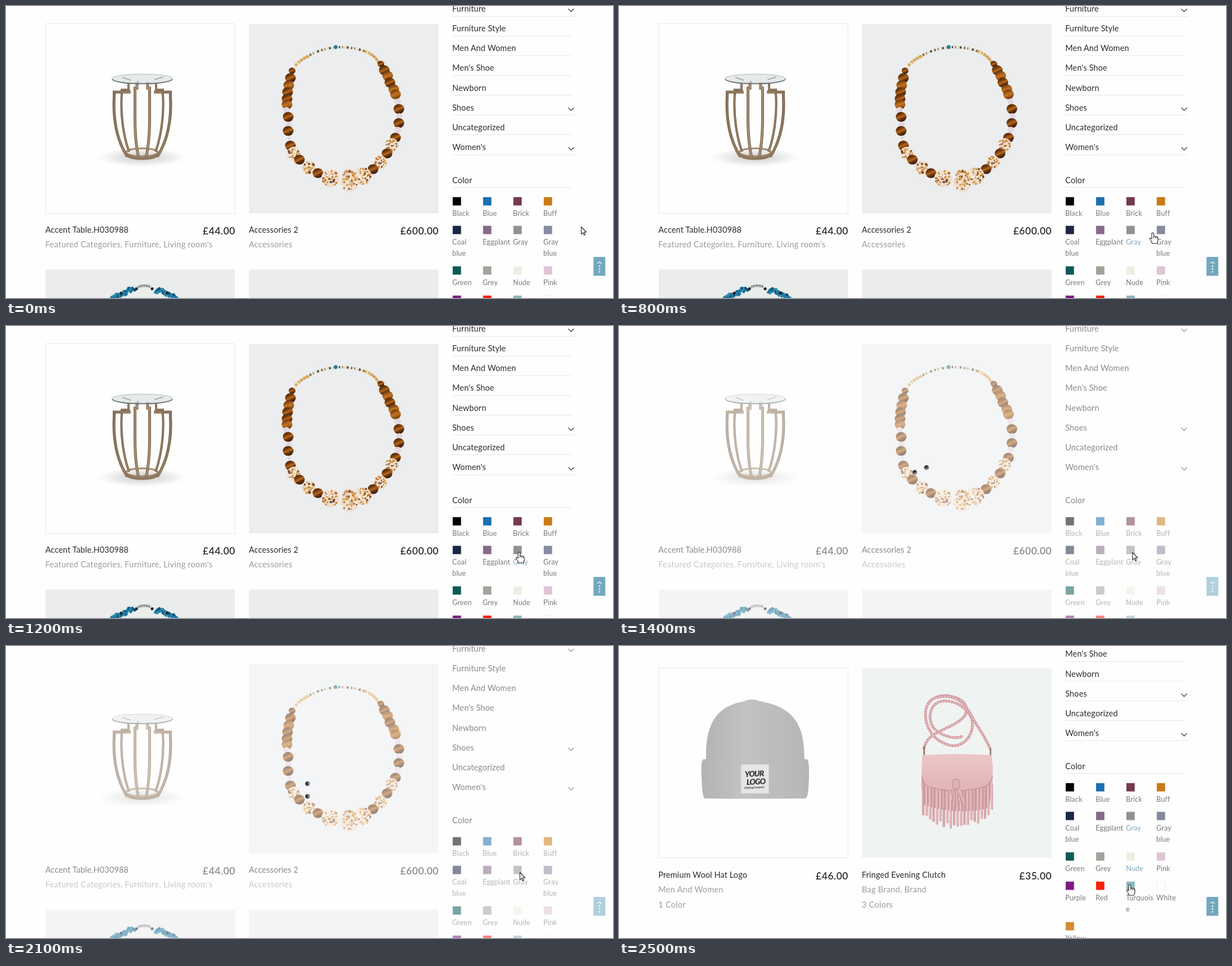
An HTML page for the animation above (2.6 s loop, 1080 by 519 pixels).

```html
<!DOCTYPE html>
<html lang="en">
<head>
<meta charset="utf-8">
<title>Shop colour filter</title>
<style>
  html, body { margin: 0; width: 100%; height: 100%; overflow: hidden; background: #fefefe; }
  svg { display: block; width: 100%; height: 100%; }
  text { font: 14.5px Lato, "Open Sans", sans-serif; fill: #2c2c2c; letter-spacing: .12px; }
  .price { font-size: 17.5px; font-weight: 600; letter-spacing: .5px; text-anchor: end; }
  .meta { fill: #9c9c9c; letter-spacing: .3px; }
  .label { font-size: 12.6px; fill: #7a7a7a; letter-spacing: .17px; }
  .label.on { fill: #80a9bb; }
  .rule { stroke: #e6e7ea; fill: none; }
  .loading .rule { opacity: 0; }
  .patch { font-weight: 900; font-style: italic; fill: #3a3a3a; letter-spacing: -.9px; }
  .patch.small { font-weight: 700; letter-spacing: -.2px; }
</style>
</head>
<body>
<svg id="stage" viewBox="0 0 1080 519" preserveAspectRatio="xMinYMin meet">
  <defs>
    <linearGradient id="wood" gradientTransform="rotate(65 .5 .5)">
      <stop offset="0" stop-color="#4d2509"/><stop offset=".3" stop-color="#7d420f"/>
      <stop offset=".5" stop-color="#b8691e"/><stop offset=".68" stop-color="#6b350d"/>
      <stop offset="1" stop-color="#35190a"/>
    </linearGradient>
    <linearGradient id="amber" gradientTransform="rotate(70 .5 .5)">
      <stop offset="0" stop-color="#6b350c"/><stop offset=".5" stop-color="#c47522"/><stop offset="1" stop-color="#6e380e"/>
    </linearGradient>
    <linearGradient id="metal" gradientUnits="userSpaceOnUse" x1="190" y1="0" x2="296" y2="0">
      <stop offset="0" stop-color="#8a7359"/><stop offset=".4" stop-color="#a58c70"/><stop offset="1" stop-color="#846d53"/>
    </linearGradient>
    <linearGradient id="wool">
      <stop offset="0" stop-color="#b5b6b7"/><stop offset=".4" stop-color="#c6c7c8"/><stop offset="1" stop-color="#b8b9ba"/>
    </linearGradient>
    <linearGradient id="leather" x2="0" y2="1">
      <stop offset="0" stop-color="#ecc6c8"/><stop offset="1" stop-color="#e2b3b7"/>
    </linearGradient>
    <linearGradient id="ball" x2="0" y2="1">
      <stop offset=".2" stop-color="#202326"/><stop offset="1" stop-color="#a4a8aa"/>
    </linearGradient>
    <radialGradient id="shade">
      <stop offset="0" stop-color="#8c8a88" stop-opacity=".5"/><stop offset="1" stop-color="#aaa" stop-opacity="0"/>
    </radialGradient>
    <pattern id="knit" width="3" height="5" patternUnits="userSpaceOnUse">
      <path d="M.8 0V3M2.3 2V5" stroke="#8d8f91" stroke-width=".7" opacity=".3"/>
    </pattern>
  </defs>
</svg>
<script>
const LOOP = 2600, STEP = 100;
const stage = document.getElementById('stage');

function add(parent, tag, attrs = {}, content = '') {
  const node = document.createElementNS('http://www.w3.org/2000/svg', tag);
  for (const key in attrs) node.setAttribute(key, attrs[key]);
  node.textContent = content;
  parent.append(node);
  return node;
}
const group = (parent, attrs) => add(parent, 'g', attrs);
const text = (parent, x, y, str, cls = '') => add(parent, 'text', { x, y, class: cls }, str);
const circle = (parent, cx, cy, r, fill) => add(parent, 'circle', { cx, cy, r, fill });
const rect = (parent, x, y, width, height, attrs) => add(parent, 'rect', { x, y, width, height, ...attrs });
const line = (parent, d, stroke, width, more) =>
  add(parent, 'path', { d, stroke, 'stroke-width': width, fill: 'none', ...more });
const shape = (parent, d, fill, more) => add(parent, 'path', { d, fill, ...more });

let seed = 7;
const random = () => (seed = seed * 16807 % 2147483647) / 2147483647;
const spread = n => (random() * 2 - 1) * n;

function card(parent, x, y, fill) {
  rect(parent, x + .5, y + .5, 337, 337, fill ? { fill } : { class: 'rule' });
}
function caption(parent, x, y, title, price, ...meta) {
  text(parent, x, y, title);
  text(parent, x + 338, y + 3, price, 'price');
  meta.forEach((str, i) => text(parent, x, y + 26 + 27 * i, str, 'meta'));
}

function drawTable(g) {
  add(g, 'ellipse', { cx: 242, cy: 269, rx: 80, ry: 17, fill: 'url(#shade)' });
  add(g, 'ellipse', { cx: 242, cy: 260, rx: 28, ry: 7, fill: 'none', stroke: '#a48c6e', 'stroke-width': 3 });
  for (const transform of ['', 'translate(485 0) scale(-1 1)']) {
    const half = group(g, { transform });
    const leg = (d, width) => {
      line(half, d, '#66523d', width);
      line(half, d, 'url(#metal)', width - 1.4);
    };
    leg('M218 138V149H206V156C203 195 210 235 219 259', 4);
    leg('M222 153H192.5V160C190 205 198 240 216 268', 5);
    leg('M233 135V146H229.5V190C229 225 231 248 236 270', 5);
  }
  line(g, 'M213 262C216 274 268 274 272 262', '#8d765a', 5);
  add(g, 'ellipse', { cx: 242.5, cy: 129, rx: 54, ry: 8, fill: '#dde3e3', 'fill-opacity': .7, stroke: '#aeb9b8' });
  line(g, 'M189 130C194 141 291 141 296 130', '#596764', 1.6);
  line(g, 'M207 127L222 132M234 133L236 136M264 131L280 126', '#a39d90', 1.5);
}

function speckled(g, x, y, r) {
  circle(g, x, y, r, '#efdccb');
  for (let i = 0; i < r * 3.2; i++) {
    const a = random() * 6.283, d = Math.sqrt(random()) * (r - 1.5);
    const fill = ['#c4812f', '#d79a4d', '#fff5ec', '#6d4030', '#c9893e'][i % 5];
    circle(g, x + d * Math.cos(a), y + d * Math.sin(a), .8 + random() * 1.4, fill);
  }
}

// Bead strings: x, y, kind (w wood, a amber, k knot, p pink, t tiny, s small speckled, b big speckled)
const LEFT = '509,115,k 506,128,w 503,141,a 501,153,w 500,165,w 500,175,a 499,185,p 503,211,p 502,197,w 502,222,w ' +
  '504,235,t 506,248,w 512,262,s 522,273,w 539,287,s 555,297,w 577,306,b';
const RIGHT = '667,103,k 673,114,w 679,124,a 683,136,w 690,148,a 693,157,a 697,170,p 699,183,w 700,196,p 699,208,w ' +
  '697,220,p 693,234,w 686,247,s 678,262,w 666,278,s 653,290,w 634,302,b 610,301,s 611,314,b';
const RADIUS = { k: 6, w: 9.5, a: 9.5, p: 5.5, t: 3, s: 12, b: 16 };

function drawBeads(g) {
  for (const d of ['M541 87Q562 76 583 74', 'M592 73Q618 73 637 80']) {
    line(g, d, '#e7dfcc', 5);
    line(g, d, '#45423c', 4, { 'stroke-dasharray': '2 4 1 7 3 5' });
  }
  line(g, 'M515 106Q525 94 541 88M637 80Q657 87 664 102', '#d3a04f', 5, { 'stroke-dasharray': '5 1' });
  line(g, 'M513 109L523 98M641 82L649 85', '#efe0bd', 4, { 'stroke-dasharray': '4 3' });
  circle(g, 586.5, 73, 3.4, '#237d91');
  for (const bead of (LEFT + ' ' + RIGHT).split(' ')) {
    const [x, y, kind] = bead.split(',');
    const r = RADIUS[kind];
    if ('sb'.includes(kind)) speckled(g, +x, +y, r);
    else if ('pt'.includes(kind)) circle(g, x, y, r, '#e5d5df');
    else add(g, 'ellipse', { cx: x, cy: y, rx: r, ry: r * .92, fill: `url(#${kind === 'a' ? 'amber' : 'wood'})` });
  }
}

function drawBlueBeads(g) {
  for (let i = 0; i < 46; i++) {
    const k = i / 45, x = k < .5 ? 189 + k * 78 : 266 + (k - .5) * 78;
    const y = 502 + Math.abs(x - 246) ** 2 / 190 + spread(3);
    rect(g, x - 2, y - 4, 4, 9, {
      fill: ['#176f9b', '#2a8bb4', '#0f5278', '#328fa9'][i % 4], transform: `rotate(${spread(50)} ${x} ${y})`
    });
  }
  for (const x of [205, 232, 260, 287]) circle(g, x, 501.5 + (x - 246) ** 2 / 190, 2.6, '#20232b');
  line(g, 'M234 500Q245 495 257 499', '#a6a9a9', 5, { 'stroke-dasharray': '4 1' });
  line(g, 'M236 499Q245 494 256 499', '#63686b', 1.2);
}

function drawHat(g) {
  const crown = 'M155 207C153 145 168 112 214 100Q222 99 229 96Q239 93 250 98C312 108 332 142 329.5 207Z';
  const cuff = 'M151 201Q243 211 334 201Q339 202 338 234Q337 270 332 271Q243 272 153 271Q148 270 147 234Q145 202 151 201Z';
  shape(g, crown, 'url(#wool)');
  shape(g, crown, 'url(#knit)');
  line(g, 'M155 203Q243 212 331 203', '#919394', 3, { opacity: .6 });
  shape(g, cuff, 'url(#wool)');
  shape(g, cuff, 'url(#knit)');
  rect(g, 217, 210.5, 49.5, 51.5, { fill: '#e5e6e7', stroke: '#d1d2d3' });
  const word = (x, y, size, str, cls) =>
    add(g, 'text', { x, y, class: cls, style: `font-size:${size}px`, transform: `rotate(-3 ${x} ${y})` }, str);
  word(224, 233, 14, 'YOUR', 'patch');
  word(227, 247, 14, 'LOGO', 'patch');
  word(223, 254, 5, 'Clothing Company', 'patch small');
}

function drawBag(g) {
  const strap = d => {
    line(g, d, '#c48c92', 4.6);
    line(g, d, '#e9bcc0', 3.4, { 'stroke-dasharray': '3.6 1.4' });
  };
  strap('M542 184C546 165 556 158 578 148C605 136 622 125 618 109C612 90 580 83 560 93C540 105 542 135 556 155C566 170 590 181 604 176C622 170 632 150 628 131');
  strap('M628 131C622 112 600 96 575 98C552 102 548 130 560 146C573 160 598 167 612 160');
  strap('M563 92C590 84 612 95 624 118C634 140 652 160 661 184');
  line(g, 'M543 178V196M661 182V198', '#8d7466', 2.6);

  shape(g, 'M540 195H663L664 250L658 288Q600 302 541 282L538 248Z', '#cf9fa4');
  for (let i = 0; i < 21; i++) {
    const x = 541 + i * 6.1, end = 320 - (x - 597) ** 2 / 185 + spread(6);
    line(g, `M${x} 236V${end}`, i % 3 ? '#e6bbbf' : '#dba9ae', 4);
    line(g, `M${x + 1.8} 246V${end}`, '#b98489', .8);
  }
  shape(g, 'M541 194Q602 190 662 194C667 214 667 236 655 248Q603 267 548 249C535 237 538 211 541 194Z', 'url(#leather)');
  line(g, 'M539 232Q542 246 549 249Q603 266 655 248Q663 240 665 230', '#c4888e', 1.2);
  for (let i = -4; i < 5; i++) {
    line(g, `M${600 + i * .8} 250Q${600 + i * 2} 268 ${602 + i * 3.2} ${285 - Math.abs(i)}`, i % 2 ? '#c9949a' : '#e6b9bd', 2.8);
  }
  rect(g, 594, 237, 12, 17, { rx: 3, fill: '#dfb0b4', stroke: '#c08a90' });
}

const SWATCHES = [
  ['Black', '#000'], ['Blue', '#1b70af'], ['Brick', '#743a4a'], ['Buff', '#c97a18'],
  ['Coal|blue', '#1c2745'], ['Eggplant', '#876a87'], ['Gray', '#929292'], ['Gray|blue', '#858a9f'],
  ['Green', '#0c5a57'], ['Grey', '#a5a19a'], ['Nude', '#efece2'], ['Pink', '#dfc6d6'],
  ['Purple', '#7c1b82'], ['Red', '#f8210b'], ['Turquois|e', '#8cb6c0'], ['White', '#fff'],
  ['Yellow', '#d38b30']
];
const ROWS = [340, 391, 463, 515, 587], COLUMNS = [794, 848, 902, 956];

function drawSidebar(g) {
  const menu = ['Furniture', 'Furniture Style', 'Men And Women', "Men's Shoe", 'Newborn', 'Shoes', 'Uncategorized', "Women's"];
  menu.forEach((name, i) => {
    const y = 10 + i * 35.15, open = [0, 5, 7].includes(i);
    const ruleY = Math.round(y + 7.5) + .5;
    text(g, 794, y, name);
    line(g, `M794 ${ruleY}H${open ? 1013 : 1007}`, '#e6e7ea', 1, { class: 'rule' });
    if (open) line(g, `M1000.5 ${y - 5}l5 5l5-5`, '#444', 1.3);
  });
  text(g, 794, 315, 'Color');
  line(g, 'M794 322.5H1007', '#e6e7ea', 1, { class: 'rule' });
  return SWATCHES.map(([name, fill], i) => {
    const x = COLUMNS[i % 4], y = ROWS[i >> 2];
    rect(g, x + .8, y - .3, 14.8, 14.8, { fill, ...(fill === '#fff' && { stroke: '#eee' }) });
    return name.split('|').map((part, k) => text(g, x, y + 32.5 + 20.5 * k, part, 'label'));
  });
}

const shop = group(stage);

const listing = group(shop);
card(listing, 70, 31);
card(listing, 432, 31, '#ebedee');
card(listing, 70, 468, '#ebecec');
card(listing, 432, 468, '#ebecec');
drawTable(listing);
drawBeads(listing);
drawBlueBeads(listing);
caption(listing, 70, 402.5, 'Accent Table.H030988', '£44.00', "Featured Categories, Furniture, Living room's");
caption(listing, 432, 402.5, 'Accessories 2', '£600.00', 'Accessories');

const filtered = group(shop);
card(filtered, 70, 39);
card(filtered, 432, 39, '#eff3f2');
drawHat(filtered);
drawBag(filtered);
caption(filtered, 70, 411.5, 'Premium Wool Hat Logo', '£46.00', 'Men And Women', '1 Color');
caption(filtered, 432, 411.5, 'Fringed Evening Clutch', '£35.00', 'Bag Brand, Brand', '3 Colors');

const sidebar = group(shop);
const labels = drawSidebar(sidebar);

rect(shop, 1045.3, 446, 21, 33.5, { fill: '#72a8bf' });
line(shop, 'M1052.5 458l3.5-3.5l3.5 3.5', '#fff', 1.2);
for (const y of [462.5, 467.5, 472.5]) circle(shop, 1056, y, 1.3, '#fff');

const spinner = group(stage);
for (const x of [-11.3, 11.3]) circle(spinner, x, 0, 4.2, 'url(#ball)');

const outline = { stroke: '#222', 'stroke-width': 1.1, 'stroke-linejoin': 'round' };
const arrow = shape(stage, 'M.5.5V13.6L3.5 10.8L5.5 15.3L7.5 14.4L5.5 10H9.6Z', '#fff', outline);
const hand = group(stage);
shape(hand, 'M-2 1Q0-1 1.5 1V7Q3 5.5 4.5 7.2Q6 6 7 7.8Q9 7 9 10V14Q8 16 7.5 19H-1.5Q-2 16-5 12Q-6.5 9.5-4.5 9.2Q-3 9.5-2 11Z', '#fff', outline);
line(hand, 'M1.5 7V10M4.5 7.5V10M7 8V10.5', '#222', .9);

// Pointer path: ms, x, y
const PATH = [[0, 1023, 392], [300, 1023, 392], [400, 1011, 401], [800, 950, 403], [1000, 917, 402], [1100, 913, 402],
  [2300, 914, 402], [2400, 912, 412], [2500, 909, 424]];
const CLICK = 1200, SWAP = 2200, GRAY = 6, GRAY_BLUE = 7, NUDE = 10;

function pointerAt(t) {
  const i = PATH.findIndex(p => p[0] >= t);
  if (i < 1) return PATH[0].slice(1);
  const [t0, x0, y0] = PATH[i - 1], [t1, x1, y1] = PATH[i];
  const k = (t - t0) / (t1 - t0);
  return [x0 + (x1 - x0) * k, y0 + (y1 - y0) * k];
}
const show = (node, on) => node.setAttribute('visibility', on ? 'visible' : 'hidden');

function draw(now) {
  const t = Math.floor(now % LOOP / STEP) * STEP;
  const loading = t > CLICK && t < SWAP, done = t >= SWAP;
  const [x, y] = pointerAt(t);

  shop.setAttribute('opacity', loading ? .55 : 1);
  shop.setAttribute('class', loading ? 'loading' : '');
  show(listing, !done);
  show(filtered, done);
  sidebar.setAttribute('transform', `translate(0 ${done ? -96 : 0})`);

  const lit = done ? [GRAY, NUDE] : loading || x > 1015 ? [] : [x > 956 ? GRAY_BLUE : GRAY];
  labels.forEach((parts, i) => parts.forEach(p => p.classList.toggle('on', lit.includes(i))));

  show(spinner, loading);
  spinner.setAttribute('transform', `translate(536.7 256) rotate(${-22 + (t - 1400) * 292 / 700})`);

  const overSwatch = x < 1015 && !loading;
  show(hand, overSwatch);
  show(arrow, !overSwatch);
  (overSwatch ? hand : arrow).setAttribute('transform', `translate(${x} ${y})`);
  requestAnimationFrame(draw);
}
draw(performance.now());
</script>
</body>
</html>
```
